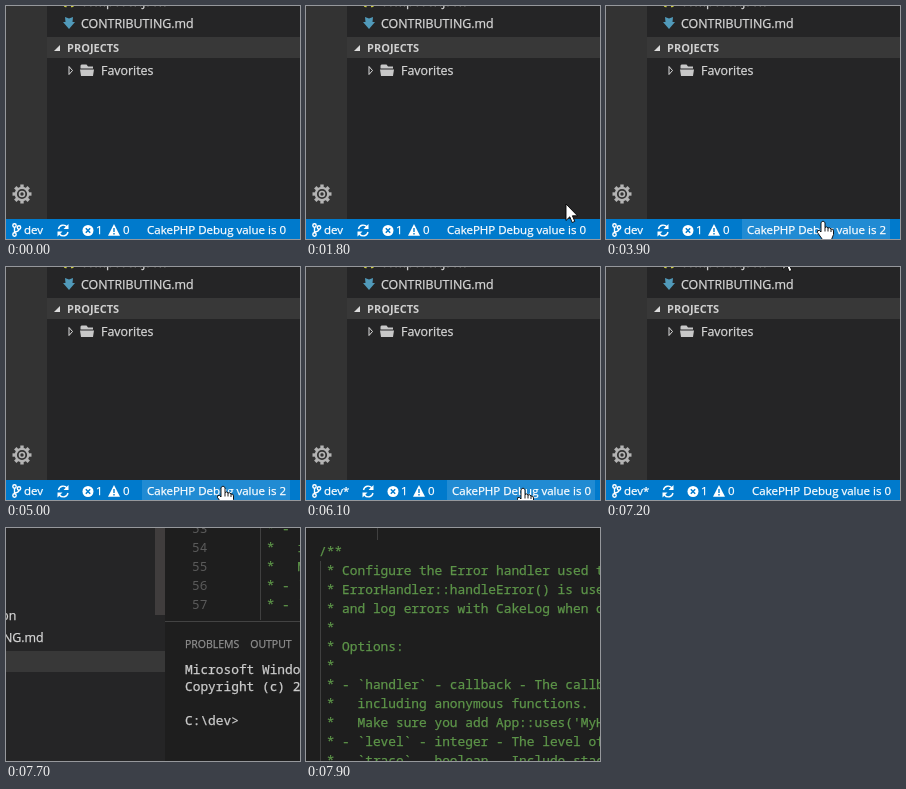
Recreate the animation shown at these times as an HTML page. Size 294 by 233 pixels, loop 8000 ms.

```html
<!DOCTYPE html>
<html lang="en">
<head>
<meta charset="utf-8">
<title>Status bar debug toggle</title>
<style>
html, body { margin: 0; width: 100%; height: 100%; overflow: hidden; background: #1e1e1e; }
svg { display: block; width: 294px; height: 233px; }
text { white-space: pre; font-family: "Open Sans", "Noto Sans", sans-serif; stroke-width: .25; }
.tree { font-size: 12.4px; fill: #d6d6d6; stroke: #d6d6d6; }
.head { font-size: 11px; font-weight: 700; fill: #cfcfcf; }
.tab { font-size: 10.5px; fill: #8f8f8f; stroke: #8f8f8f; }
.status { font-size: 11.5px; fill: #fff; stroke: #fff; }
.mono { font-family: "Noto Sans Mono", "DejaVu Sans Mono", monospace; font-size: 12.83px; }
.comment { fill: #5d9549; stroke: #5d9549; }
.number { fill: #5a5a5a; }
.shell { fill: #ccc; stroke: #ccc; }
.line { fill: none; stroke: #fff; stroke-width: 1.4; }
</style>
</head>
<body>
<svg viewBox="0 0 294 233">
  <g id="world">
    <g id="editor"></g>
    <g id="sidebar">
      <rect x="41" y="-300" width="268" height="520" fill="#252526"/>
      <rect y="-300" width="41" height="520" fill="#333"/>
      <rect x="41" y="31" width="268" height="21" fill="#383838"/>
      <rect x="299" y="-200" width="10" height="195" fill="#403d3d"/>
      <text class="tree" x="75" y="-21">build.xml</text>
      <text class="tree" x="75" y="-.5">composer.json</text>
      <text class="tree" x="75" y="21.500">CONTRIBUTING.md</text>
      <text class="head" x="61" y="45.500">PROJECTS</text>
      <text class="tree" x="95" y="68.700">Favorites</text>
      <text x="56" y="-1" font-size="13" font-weight="700" fill="#cbcb41">{ }</text>
      <path d="M59 11l4 1.500 4-1.500-.5 5H69l-6 7-6-7h2.500z" fill="#519aba"/>
      <path d="M54 39v6h-6z" fill="#ddd"/>
      <path d="M63 60.500v8l3.500-4z" fill="none" stroke="#ddd"/>
      <path d="M75.500 58.500h5l1.500 2h5v2H74.500v-3z" fill="#c8c8c8"/>
      <path d="M74 63.500h14l-1 6.500H75z" fill="#c8c8c8"/>
      <g id="gear" transform="translate(16 188)" fill="none" stroke="#b4b4b4">
        <circle r="6.200" stroke-width="2.200"/><circle r="2.500" stroke-width="1.600"/>
      </g>
    </g>
    <rect y="213" width="900" height="23" fill="#007acc"/>
    <g class="line">
      <circle cx="8.500" cy="219.500" r="1.700"/><circle cx="8.500" cy="228.500" r="1.700"/><circle cx="13" cy="221.500" r="1.700"/>
      <path d="M8.500 221v6M13 223q0 2.500-4.500 3"/>
    </g>
    <text class="status" id="branch" x="18" y="228"></text>
    <g id="items">
      <rect id="hover" x="136" y="213" width="148" height="22" fill="#fff" opacity=".13"/>
      <path class="line" d="M52.500 223a4.800 4.800 0 0 1 8.500-2M62 226a4.800 4.800 0 0 1-8.500 2"/>
      <path d="M62.500 218v5h-5zM51.500 230.500v-5h5z" fill="#fff"/>
      <circle cx="82" cy="224.500" r="5.500" fill="#fff"/>
      <path d="M79.800 222.300l4.400 4.400m0-4.400l-4.400 4.400" stroke="#007acc" stroke-width="1.500"/>
      <path d="M108 218l6 11.800h-12z" fill="#fff"/>
      <path d="M108 222v4m0 1v1.500" stroke="#007acc" stroke-width="1.400"/>
      <text class="status" x="90" y="228">1</text>
      <text class="status" x="117" y="228">0</text>
      <text class="status" id="value" x="141" y="228"></text>
    </g>
  </g>
  <g id="cursor" fill="#fff" stroke="#000" stroke-width=".9" stroke-linejoin="round">
    <path id="arrow" d="M0 0V16.500L3.800 12.800 6.200 18.500 8.800 17.400 6.400 11.800H11.500Z"/>
    <g id="hand">
      <path d="M-2 1.500Q0-1.500 2 1.500V6.500Q4 5 5 7 7 6 8 8 10.500 7.500 10.500 10V13.500L8.500 18.500H-.5L-5.500 11.500Q-6 8.500-3.500 9.500L-2 11Z"/>
      <path d="M2 6.500v4M5 7v3.500M8 8v3" fill="none"/>
    </g>
  </g>
</svg>
<script>
const LOOP = 8000, STEP = 100;
const $ = id => document.getElementById(id);

function add(parent, tag, attrs, text = "") {
  const el = document.createElementNS("http://www.w3.org/2000/svg", tag);
  for (const key in attrs) el.setAttribute(key, attrs[key]);
  el.textContent = text;
  parent.append(el);
}

function buildEditor() {
  const editor = $("editor");
  const comment = [
    "/**",
    " * Configure the Error handler used to handle errors for your application.",
    " * ErrorHandler::handleError() is used. It will display errors using Debugger,",
    " * and log errors with CakeLog when debug = 0.",
    " *",
    " * Options:",
    " *",
    " * - `handler` - callback - The callback to handle errors. You can set this",
    " *   including anonymous functions.",
    " *   Make sure you add App::uses('MyHandler', 'Error') when using a custom",
    " * - `level` - integer - The level of errors you are interested in capturing.",
    " * - `trace` - boolean - Include stack traces for errors in log files."
  ];
  add(editor, "rect", { x: 309, y: -300, width: 600, height: 520, fill: "#1e1e1e" });
  add(editor, "path", { d: "M404.500-215V0M461.500-250v14", stroke: "#404040" });
  comment.forEach((line, i) => {
    const y = -220 + 19 * i;
    add(editor, "text", { class: "mono number", x: 336, y }, 46 + i);
    add(editor, "text", { class: "mono comment", x: 403, y }, line);
  });
  add(editor, "path", { d: "M309 1.500h600", stroke: "#434343" });
  add(editor, "text", { class: "tab", x: 329, y: 28 }, "PROBLEMS    OUTPUT    DEBUG CONSOLE    TERMINAL");
  [[54, "Microsoft Windows [Version 6.1.7601]"],
   [71, "Copyright (c) 2009 Microsoft Corporation."],
   [105, "C:\\dev>"]].forEach(([y, line]) =>
    add(editor, "text", { class: "mono shell", x: 329, y }, line));
}

function buildGear() {
  for (let angle = 0; angle < 360; angle += 45)
    add($("gear"), "path", { d: "M0-9.500v3", "stroke-width": 3.4, transform: `rotate(${angle})` });
}

// Each track lists [time, x, y]; the pointer is hidden outside its visits.
const visits = [
  [[700, 268, 221], [800, 286, 223], [899, 294, 224]],
  [[1800, 260, 198], [2100, 243, 140], [2400, 222, 198], [2500, 217, 215], [2600, 217, 220],
   [3800, 217, 220], [3900, 217, 215], [4100, 230, 162], [4300, 243, 133], [4600, 243, 133],
   [4800, 230, 170], [4900, 220, 206], [5000, 217, 219], [5100, 217, 221], [6600, 217, 221],
   [6700, 217, 214], [6900, 207, 130], [7200, 177, -14], [7499, 177, -14]]
];
const camera = [[7400, 0, 0], [7500, 11, -6], [7600, 45, -23], [7700, 150, -92], [7800, 280, -178], [7900, 390, -248]];

function sample(track, t) {
  const next = track.findIndex(key => key[0] > t);
  if (next === 0) return track[0].slice(1);
  if (next < 0) return track.at(-1).slice(1);
  const [t0, x0, y0] = track[next - 1], [t1, x1, y1] = track[next];
  const p = (t - t0) / (t1 - t0);
  return [x0 + (x1 - x0) * p, y0 + (y1 - y0) * p];
}

const show = (id, on) => $(id).setAttribute("display", on ? "inline" : "none");
const move = (id, x, y) => $(id).setAttribute("transform", `translate(${x} ${y})`);

function render(time) {
  const t = Math.floor(time % LOOP / STEP) * STEP;
  const [cx, cy] = sample(camera, t);
  move("world", -cx, -cy);

  const modified = t >= 5200;
  const shift = modified ? 5 : 0;
  $("branch").textContent = modified ? "dev*" : "dev";
  $("value").textContent = `CakePHP Debug value is ${t >= 3200 && t < 6100 ? 2 : 0}`;
  move("items", shift, 0);

  const visit = visits.find(track => t >= track[0][0] && t <= track.at(-1)[0]);
  let over = false;
  if (visit) {
    const [x, y] = sample(visit, t);
    over = y >= 213 && x >= 136 + shift && x < 284 + shift;
    move("cursor", x, y);
  }
  show("cursor", visit);
  show("hand", over);
  show("arrow", !over);
  show("hover", over);
}

buildEditor();
buildGear();
let start;
function tick(now) {
  start ??= now;
  render(now - start);
  requestAnimationFrame(tick);
}
render(0);
requestAnimationFrame(tick);
</script>
</body>
</html>
```
